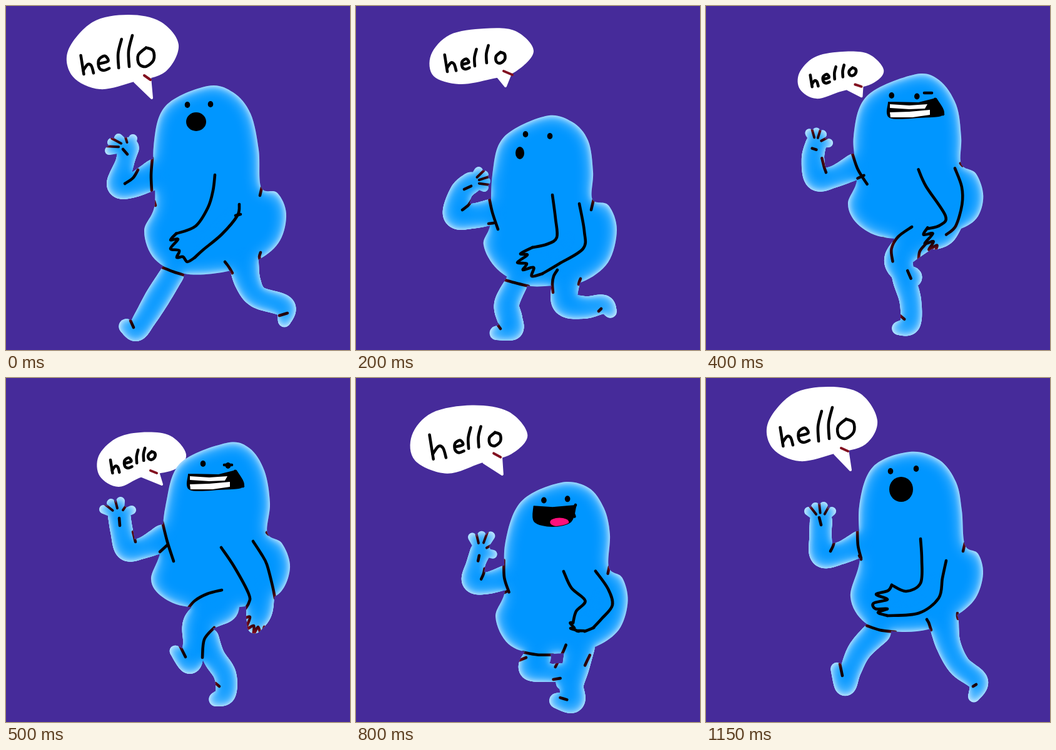
An HTML page with a canvas for the animation above (1.2 s loop, 550x550 px).

```html
<!DOCTYPE html>
<html lang="en">
<head>
<meta charset="utf-8">
<title>Hello walk</title>
<style>
html, body { margin: 0; width: 100%; height: 100%; overflow: hidden; background: #462b9a; }
canvas { display: block; width: 100vw; height: 100vh; }
</style>
</head>
<body>
<canvas id="stage" width="550" height="550" role="img" aria-label="hello"></canvas>
<script>
const SIZE = 550, STEP = 50, STEPS = 24;
const BLUE = '#0096ff', RED = '#c0102a', DARK_RED = '#82101f', PINK = '#ff0f7b';

// Key poses. Limbs hold x y radius, everything else x y; letters hold x, baseline, height.
const poses = [
  { at: 0,
    body: '322 128 363 138 391 172 404 230 408 290 434 299 448 332 438 375 405 405 350 425 285 428 238 405 221 360 238 316 236 225 255 160',
    legF: '266 428 19 243 465 20 222 500 18 208 520 16 192 512 12',
    legN: '380 410 24 386 440 21 402 465 18 445 480 17 445 504 10',
    armF: '240 268 24 200 288 19 180 285 19 190 250 15 196 226 17',
    armN: '360 330 10 330 360 10 290 385 10',
    tips: '165 231 169 218 180 211 203 212',
    palm: '187 229 194 237', elbow: '190 284 203 275 211 262',
    pit: '234 243 232 270 233 295', rump: '409 290 406 303', waist: '237 312 239 319',
    hipF: '250 418 268 425 287 431', hipN: '350 409 354 414 358 420 362 427', backN: '407 394 405 401 407 408',
    footF: '199 503 204 514', footN: '437 495 450 491', knee: '367 335 375 333',
    inner: '334 270 331 295 323 322 303 352 272 364',
    hand: '272 364 263 374 275 373 263 388 277 391 273 402 283 401 290 409 302 402',
    outer: '302 402 315 390 345 365 370 335 373 317',
    eyes: '290 158 327 157', oh: '304 185 16 15',
    bubble: '195 14 247 25 276 62 255 105 205 121 150 133 107 113 99 72 138 26',
    tail: '206 121 233 147 230 114', nick: '221 111 231 118',
    word: '131 109 30 156 103 24 182 99 46 199 97 50 224 98 33' },
  { at: 4,
    body: '303 176 345 185 371 215 379 265 378 309 404 319 417 358 403 410 362 441 315 447 270 446 226 421 204 382 215 347 218 270 236 210',
    legF: '256 444 18 241 476 20 246 500 20 250 518 16 224 523 11',
    legN: '337 435 22 334 474 21 365 482 18 396 477 15 407 489 10',
    armF: '222 328 21 185 336 20 160 333 21 168 298 18 185 282 17',
    armN: '340 370 10 330 390 10 290 405 10',
    tips: '196 264 205 270 208 280 205 290',
    palm: '173 293 184 288', elbow: '170 326 180 318 187 307',
    pit: '213 307 218 330 227 357', rump: '380 309 376 326', waist: '212 348 220 347',
    hipF: '238 438 256 443 276 448', hipN: '322 422 316 432 314 444 315 458', backN: '359 436 357 441 356 445',
    footF: '226 509 231 516', footN: '388 488 392 484',
    inner: '314 302 319 340 321 370 305 381 282 386',
    hand: '282 386 263 396 274 398 258 410 273 412 267 422 284 418 281 432 298 428',
    outer: '298 428 325 412 363 388 365 360 357 316',
    eyes: '271 205 310 208', oh: '262 235 7 10',
    bubble: '205 36 255 40 284 72 255 105 215 117 165 125 124 112 120 78 150 46',
    tail: '226 112 239 128 247 108', nick: '236 104 250 110',
    word: '152 105 27 175 101 17 191 96 27 210 91 28 231 92 19' },
  { at: 6,
    body: '313 124 355 134 385 175 392 225 395 266 419 280 429 318 415 358 370 379 320 390 270 385 233 360 219 322 233 287 216 222 236 160',
    legF: '290 390 21 292 430 19 296 470 17 297 508 16 276 515 10',
    legN: '345 378 26 314 425 21 330 436 17 370 423 16 387 438 10',
    armF: '225 267 20 190 282 18 162 284 21 160 250 18 176 228 15',
    armN: '390 330 8 360 360 8 330 365 8',
    tips: '182 204 192 211 196 222 196 236',
    palm: '163 239 175 231', elbow: '176 278 174 268 171 249',
    pit: '216 250 225 271 243 287', rump: '394 265 396 272', waist: '236 284 243 287',
    hipF: '268 386 290 391 310 390', hipN: '313 379 294 405 294 432 310 457', backN: '370 375 369 378 368 381',
    footF: '281 502 288 508', footN: '372 432 374 437', knee: '332 425 343 418',
    inner: '331 258 334 282 370 329 352 345 325 343',
    hand: '325 343 315 350 328 352 309 362 325 362 311 373 330 371 319 382 332 386',
    outer: '332 386 365 378 397 345 404 305 394 265',
    eyes: '277 157 318 157', oh: '257 188 6 6',
    bubble: '210 54 255 56 280 80 258 101 215 113 170 121 144 108 143 86 165 62',
    tail: '235 108 246 118 255 100', nick: '244 101 255 104',
    word: '168 105 19 186 101 13 200 96 20 216 93 20 235 91 15' },
  { at: 10,
    body: '352 104 389 112 413 148 422 200 418 248 441 264 454 298 446 332 425 352 375 366 292 366 250 350 232 322 247 277 255 205 278 137',
    legF: '325 415 15 332 445 18 350 474 18 351 505 16 335 514 11',
    legN: '345 365 28 306 390 22 300 425 17 294 456 17 270 436 9',
    armF: '252 256 22 218 272 17 193 274 18 185 245 18 181 220 18',
    armN: '408 335 21 405 372 21 397 398 11',
    tips: '156 210 168 200 183 197 201 211',
    palm: '181 224 182 236', elbow: '207 262 205 254 203 246',
    pit: '250 230 258 262 268 293', rump: '417 247 420 250', waist: '246 278 258 267',
    hipF: '292 368 291 369 289 371', hipN: '345 339 322 345 302 356 289 371', backN: '333 399 317 418 314 447',
    footF: '335 488 341 493', footN: '278 428 287 446',
    inner: '344 271 365 302 388 345 388 360 378 375',
    hand: '378 372 375 386 390 382 384 401 396 396 396 409 403 398 408 410 413 398',
    outer: '430 352 426 332 417 298 408 281 395 261',
    eyes: '315 137 355 140', lid: '349 139 361 139',
    grin: '292 154 340 155 368 148 379 173 340 178 294 178', tick: '366 149 372 162 379 173',
    teeth: '294 157 325 159 354 157 350 164 325 165 294 163', lower: '294 170 325 169 358 166 358 174 330 178 295 178',
    bubble: '215 87 262 92 288 122 270 146 218 158 180 174 150 157 148 125 175 97',
    tail: '217 157 249 170 243 150', nick: '231 148 241 152',
    word: '175 152 21 195 144 17 210 136 21 221 132 20 233 131 14' },
  { at: 13,
    body: '348 131 391 140 415 172 422 215 409 281 428 296 436 330 428 372 402 400 365 413 285 416 243 402 222 362 243 315 250 240 281 164',
    legF: '305 428 22 315 450 18 345 460 15 368 460 14 371 485 11',
    legN: '355 402 24 335 440 22 318 480 19 314 516 19 291 503 12',
    armF: '245 284 20 215 288 19 199 278 20 210 250 14 223 236 15',
    armN: '395 310 10 400 350 15 408 378 14',
    tips: '207 216 221 210 236 210 240 236',
    palm: '219 237 215 246', elbow: '210 281 218 272 222 262',
    pit: '245 262 243 290 248 316', rump: '411 281 405 297', waist: '247 312 248 317',
    hipF: '282 417 304 419 327 419', hipN: '337 400 326 417 310 443 300 468', backN: '358 446 350 458 345 474',
    footF: '356 473 362 474', footN: '300 498 308 508',
    inner: '324 284 340 308 372 331 370 360 381 390',
    hand: '381 390 388 386 390 396 394 385 403 394 404 382 414 387 415 377 426 372',
    outer: '425 368 409 348 413 325 398 296 370 274',
    eyes: '314 157 355 157',
    grin: '294 167 330 171 370 167 361 195 325 196 293 192', tick: '370 166 362 180 363 194',
    teeth: '297 168 330 172 357 172 345 179 320 180 294 176', lower: '293 187 310 189 330 190 328 196 310 196 296 193',
    tongue: '343 191 13 6',
    bubble: '190 58 250 68 280 103 255 131 205 148 155 166 108 145 104 105 135 68',
    tail: '206 146 238 162 236 132', nick: '222 132 234 137',
    word: '148 146 37 178 133 19 192 126 30 206 122 30 230 119 20' },
  { at: 19,
    body: '308 117 354 124 380 158 392 200 402 240 426 258 436 296 421 338 388 362 340 376 290 378 246 362 226 318 235 278 229 205 248 145',
    legF: '278 382 20 248 412 21 270 428 15 288 437 16 280 456 11',
    legN: '362 370 24 366 410 21 372 460 19 380 503 19 354 515 11',
    armF: '238 266 19 205 282 16 178 285 18 171 262 17 172 232 18',
    armN: '380 300 10 360 315 10 320 330 10',
    tips: '160 209 175 208 189 209 194 238',
    palm: '172 243 173 252', elbow: '191 276 190 268 189 262',
    pit: '230 234 234 262 244 283', rump: '401 238 403 243', waist: '230 286 238 277',
    hipF: '254 373 275 379 300 380', hipN: '337 365 338 368 338 372 338 377', backN: '388 354 386 362 385 370',
    footF: '268 447 283 443', footN: '357 504 370 505', knee: '262 409 272 405',
    inner: '342 250 351 280 361 302 335 306 312 310',
    hand: '312 310 296 317 306 322 292 336 306 335 299 348 314 342 314 355 330 349',
    outer: '330 349 375 340 404 318 406 295 397 261',
    eyes: '288 148 323 144',
    grin: '275 158 300 158 333 155 328 178 304 192 278 181', tick: '332 154 334 160 338 163',
    tongue: '308 186 17 8',
    bubble: '185 31 240 41 270 80 245 113 200 124 140 140 88 120 82 80 115 45',
    tail: '204 125 231 147 228 113', nick: '219 111 229 118',
    word: '121 114 38 154 107 22 174 101 37 192 100 36 216 101 27' },
  { at: 23,
    body: '326 118 373 131 400 167 409 212 414 267 435 281 443 313 431 352 400 380 355 402 300 405 254 391 231 350 246 290 245 205 267 142',
    legF: '275 405 21 246 435 19 231 468 17 222 492 16 209 464 10',
    legN: '380 390 24 387 425 20 405 460 18 435 485 16 428 510 9',
    armF: '247 265 21 215 280 18 187 283 20 183 255 18 184 228 18',
    armN: '365 320 10 330 355 10 290 355 10',
    tips: '164 213 175 206 188 205 201 213',
    palm: '181 223 184 235', elbow: '199 277 203 269 205 262',
    pit: '242 243 243 268 248 288', rump: '414 264 411 277', waist: '245 284 248 290',
    hipF: '257 396 278 403 303 406', hipN: '353 386 356 391 358 397 360 403', backN: '402 376 402 381 403 385',
    footF: '214 457 218 476', footN: '427 493 432 490',
    inner: '343 257 345 290 343 328 320 341 297 331',
    hand: '297 331 291 340 272 346 290 354 268 360 271 369 290 369 275 375 290 380',
    outer: '290 380 340 376 372 352 378 320 384 292',
    eyes: '295 149 336 145', oh: '312 178 19 20',
    bubble: '195 14 247 25 274 68 255 106 205 121 150 133 107 113 99 72 138 26',
    tail: '206 121 231 147 226 114', nick: '216 112 227 117',
    word: '130 109 30 156 103 24 182 101 48 199 97 50 224 98 34' }
];
for (const p of poses)
  for (const k in p) if (k !== 'at') p[k] = p[k].split(' ').map(Number);

const LINES = ['palm', 'elbow', 'pit', 'rump', 'waist', 'hipF', 'hipN', 'backN',
  'footF', 'footN', 'knee', 'inner', 'hand', 'outer', 'lid', 'tick'];
const LIMBS = ['legF', 'legN', 'armF', 'armN'];
const STILL = ['bubble', 'tail', 'nick', 'word'];

function layer() {
  const c = document.createElement('canvas');
  c.width = c.height = SIZE;
  return c.getContext('2d');
}
const stage = document.getElementById('stage').getContext('2d');
const mask = layer(), outside = layer(), glow = layer(), ink = layer(), tint = layer();

// Smooth cyclic blend between key poses; parts absent from one side switch halfway.
function sample(name, s) {
  const n = poses.length;
  let i = n - 1;
  while (poses[i].at > s) i--;
  const pose = k => poses[(k + n) % n];
  const time = k => pose(k).at + Math.floor(k / n) * STEPS;
  const t1 = time(i), t2 = time(i + 1), d = t2 - t1, u = (s - t1) / d;
  const a = pose(i)[name], b = pose(i + 1)[name];
  if (!a || !b) return u < .5 ? a : b;
  const p = pose(i - 1)[name] || a, q = pose(i + 2)[name] || b;
  const w1 = .7 * d / (t2 - time(i - 1)), w2 = .7 * d / (time(i + 2) - t1);
  const v = u * u, w = v * u;
  return a.map((x, k) =>
    (2 * w - 3 * v + 1) * x + (3 * v - 2 * w) * b[k] +
    (w - 2 * v + u) * (b[k] - p[k]) * w1 + (w - v) * (q[k] - x) * w2);
}

// The body sinks as the near leg takes the weight.
function sink(list, stride, s) {
  const far = Math.abs(s - 16) / 3;
  if (far >= 1) return list;
  const depth = 42 * Math.cos(far * Math.PI / 2) ** 2;
  return list.map((y, i) =>
    i % stride === 1 ? y + depth * Math.max(0, Math.min(1, (520 - y) / 110)) : y);
}

function poseAt(s) {
  const out = {};
  for (const name of new Set(poses.flatMap(Object.keys))) {
    if (name === 'at') continue;
    const list = sample(name, s);
    if (!list) continue;
    const stride = LIMBS.includes(name) ? 3 : name === 'tongue' || name === 'oh' ? 4 : 2;
    out[name] = STILL.includes(name) ? list : sink(list, stride, s);
  }
  return out;
}

function points(list, stride = 2) {
  const out = [];
  for (let i = 0; i < list.length; i += stride) out.push(list.slice(i, i + stride));
  return out;
}

function curve(c, pts, closed, joined) {
  const n = pts.length;
  const at = i => closed ? pts[(i + n) % n] : pts[Math.max(0, Math.min(n - 1, i))];
  if (!joined) c.moveTo(...pts[0]);
  for (let i = 0; i < (closed ? n : n - 1); i++) {
    const [p, a, b, q] = [at(i - 1), at(i), at(i + 1), at(i + 2)];
    c.bezierCurveTo(a[0] + (b[0] - p[0]) / 6, a[1] + (b[1] - p[1]) / 6,
      b[0] - (q[0] - a[0]) / 6, b[1] - (q[1] - a[1]) / 6, b[0], b[1]);
  }
  if (closed) c.closePath();
}

function fillCurve(c, list, color) {
  c.fillStyle = color;
  c.beginPath();
  curve(c, points(list), true);
  c.fill();
}

function line(c, pts, color, width) {
  c.strokeStyle = color;
  c.lineWidth = width;
  c.lineCap = c.lineJoin = 'round';
  c.beginPath();
  curve(c, pts);
  c.stroke();
}

function oval(c, x, y, rx, ry, color) {
  c.fillStyle = color;
  c.beginPath();
  c.ellipse(x, y, rx, ry, 0, 0, 7);
  c.fill();
}

function limb(c, list) {
  const pts = points(list, 3), n = pts.length;
  const at = i => pts[Math.max(0, Math.min(n - 1, i))];
  for (let i = 0; i < n - 1; i++)
    for (let u = 0; u <= 1; u += .05) {
      const [x, y, r] = [0, 1, 2].map(k => {
        const p = at(i - 1)[k], a = at(i)[k], b = at(i + 1)[k], q = at(i + 2)[k];
        return a + u * ((b - p) / 2 + u * (p - 2.5 * a + 2 * b - q / 2 + u * (1.5 * (a - b) + (q - p) / 2)));
      });
      oval(c, x, y, r, r, BLUE);
    }
}

const toward = (a, b, u) => [a[0] + (b[0] - a[0]) * u, a[1] + (b[1] - a[1]) * u];

function wipe(c) {
  c.globalCompositeOperation = 'source-over';
  c.clearRect(0, 0, SIZE, SIZE);
}
function stamp(c, from, mode) {
  c.globalCompositeOperation = mode;
  c.drawImage(from.canvas, 0, 0);
}
function flood(c, color, mode) {
  c.globalCompositeOperation = mode;
  c.fillStyle = color;
  c.fillRect(0, 0, SIZE, SIZE);
}

function drawFigure(p) {
  const tips = points(p.tips), palm = p.armF.slice(-3, -1);
  wipe(mask);
  fillCurve(mask, p.body, BLUE);
  LIMBS.forEach(k => limb(mask, p[k]));
  tips.forEach(t => line(mask, [t, palm], BLUE, 14));

  // Pale rim fading inward from the silhouette
  wipe(outside);
  flood(outside, '#fff', 'source-over');
  stamp(outside, mask, 'destination-out');
  wipe(glow);
  glow.globalAlpha = .75;
  for (const r of [5, 12]) {
    glow.filter = `blur(${r}px)`;
    stamp(glow, outside, 'source-over');
  }
  glow.filter = 'none';
  glow.globalAlpha = 1;
  stamp(glow, mask, 'destination-in');
  stage.drawImage(mask.canvas, 0, 0);
  stage.drawImage(glow.canvas, 0, 0);

  // Ink lines turn red where the rim is pale
  wipe(tint);
  stamp(tint, glow, 'source-over');
  flood(tint, RED, 'source-in');
  wipe(ink);
  for (const k of LINES) if (p[k]) line(ink, points(p[k]), '#000', 4.6);
  for (let i = 0; i < 3; i++) {
    const gap = toward(tips[i], tips[i + 1], .5);
    line(ink, [toward(gap, palm, -.25), toward(gap, palm, .45)], '#000', 4);
  }
  stamp(ink, tint, 'source-atop');
  stamp(ink, mask, 'destination-in');
  stage.drawImage(ink.canvas, 0, 0);
}

function drawFace(p) {
  for (const [x, y] of points(p.eyes)) oval(stage, x, y, 4.3, 5, '#000');
  if (p.oh) oval(stage, ...p.oh, '#000');
  if (!p.grin) return;
  const g = points(p.grin);
  stage.save();
  stage.beginPath();
  stage.moveTo(...g[0]);
  stage.lineTo(...g[1]);
  stage.lineTo(...g[2]);
  curve(stage, [...g.slice(2), g[0]], false, true);
  stage.fillStyle = stage.strokeStyle = '#000';
  stage.lineWidth = 2;
  stage.fill();
  stage.stroke();
  stage.clip();
  if (p.tongue) oval(stage, ...p.tongue, PINK);
  stage.restore();
  for (const k of ['teeth', 'lower']) if (p[k]) polygon(p[k]);
}

function polygon(list, edge) {
  stage.beginPath();
  points(list).forEach(q => stage.lineTo(...q));
  stage.closePath();
  stage.fillStyle = stage.strokeStyle = '#fff';
  stage.fill();
  if (edge) {
    stage.lineWidth = edge;
    stage.lineJoin = 'round';
    stage.stroke();
  }
}

// Brush lettering, one unit tall, standing on y = 0
const glyphs = {
  h: [[-.38, -1, -.3, -.5, -.22, 0], [-.25, -.2, -.02, -.52, .18, -.45, .3, -.06]],
  e: [[-.3, -.45, .3, -.62, .08, -.97, -.32, -.7, -.3, -.2, 0, 0, .38, -.14]],
  l: [[.06, -1, -.06, -.5, -.04, 0]],
  o: [[0, -.95, -.38, -.6, -.34, -.16, 0, -.04, .36, -.35, .34, -.8, 0, -.95]]
};
function drawBubble(p) {
  fillCurve(stage, p.bubble, '#fff');
  polygon(p.tail, 4);
  line(stage, points(p.nick), DARK_RED, 4);
  points(p.word, 3).forEach(([x, y, h], i) => {
    for (const g of glyphs['hello'[i]])
      line(stage, points(g).map(([a, b]) => [x + a * h, y + b * h]), '#000', 4.6);
  });
}

function draw(s) {
  const p = poseAt(s);
  stage.fillStyle = '#462b9a';
  stage.fillRect(0, 0, SIZE, SIZE);
  drawBubble(p);
  drawFigure(p);
  drawFace(p);
}

const start = performance.now();
let shown = -1;
function tick() {
  const s = Math.floor((performance.now() - start) / STEP) % STEPS;
  if (s !== shown) draw(shown = s);
  requestAnimationFrame(tick);
}
tick();
</script>
</body>
</html>
```
